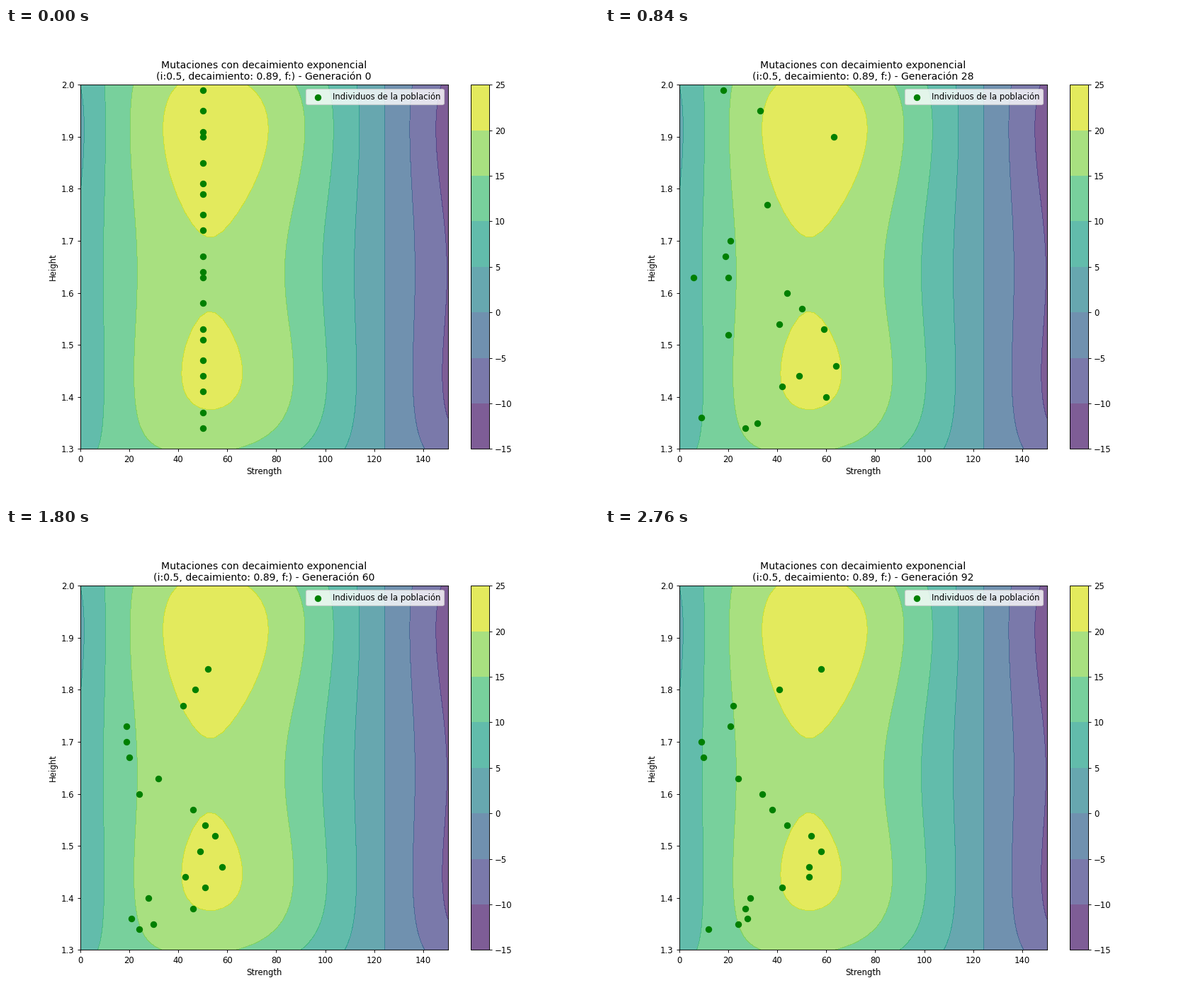
These frames come from a looping animation (837x669 px, 2.79 s). A matplotlib script:

```python
import numpy as np
import matplotlib.pyplot as plt
from matplotlib.animation import FuncAnimation

W, H, DPI = 837, 669, 83.7
FRAMES, INTERVAL = 93, 30
SIZE = 20          # individuals in the population
DECAY = 0.89
rng = np.random.default_rng(7)


def fitness(s, h):
    """Attack and defence, each scaled by a quartic height modifier."""
    u = 3 * h - 5
    atm = 0.5 - u**4 + u**2 + h / 2
    dem = 2.5 - atm
    r = 124.2 - s
    d = r - 56
    attack = np.tanh(s / 100) * r * (0.3525 - 1.3e-5 * d**2 + 4e-10 * d**4)
    defence = r * (0.0445 - 2.6e-7 * r**2)
    return attack * atm + defence * dem


def evolve():
    """Strength and height of every individual in each generation."""
    rank = np.linspace(0, 1, SIZE)
    first = 1.34 + 0.65 * rank
    first[1:-1] += rng.normal(0, 0.012, SIZE - 2)
    last = 1.34 + 0.5 * rank**1.4
    switch = rng.integers(3, 36, SIZE)

    s = np.full(SIZE, 50.0)
    strength, height = [], []
    for gen in range(FRAMES):
        h = np.where(gen < switch, first, last)
        if gen:
            # Mutants drift towards a strength that suits their height
            home = 34 + 22 * np.cos(2 * np.pi * (h - 1.49) / 0.37)
            step = 0.3 * (home - s) + rng.normal(0, 5 + 5 * 0.97**gen, SIZE)
            mutant = rng.random(SIZE) < 0.25 + 0.25 * DECAY**gen
            s = np.maximum(np.abs(s + mutant * step), 1)
        strength.append(np.rint(s))
        height.append(np.round(h, 2))
    return strength, height


strength, height = evolve()

# The small margin keeps the canvas from being truncated by a pixel
fig, ax = plt.subplots(figsize=((W + 0.01) / DPI, (H + 0.01) / DPI), dpi=DPI)
S, Y = np.meshgrid(np.linspace(0, 150, 50), np.linspace(1.3, 2.0, 50))
field = ax.contourf(S, Y, fitness(S, Y), levels=np.arange(-15, 26, 5),
                    cmap="viridis", alpha=0.7)
fig.colorbar(field, ax=ax)
dots = ax.scatter(strength[0], height[0], s=50, color="green",
                  label="Individuos de la población")
ax.set(xlim=(0, 150), ylim=(1.3, 2.0), xlabel="Strength", ylabel="Height")
ax.legend(loc="upper right")
title = ax.set_title("")


def update(gen):
    dots.set_offsets(np.column_stack([strength[gen], height[gen]]))
    title.set_text("Mutaciones con decaimiento exponencial\n"
                   f"(i:0.5, decaimiento: {DECAY}, f:) - Generación {gen}")
    return dots, title


anim = FuncAnimation(fig, update, frames=FRAMES, interval=INTERVAL,
                     repeat=True, repeat_delay=0)
plt.show()
```
